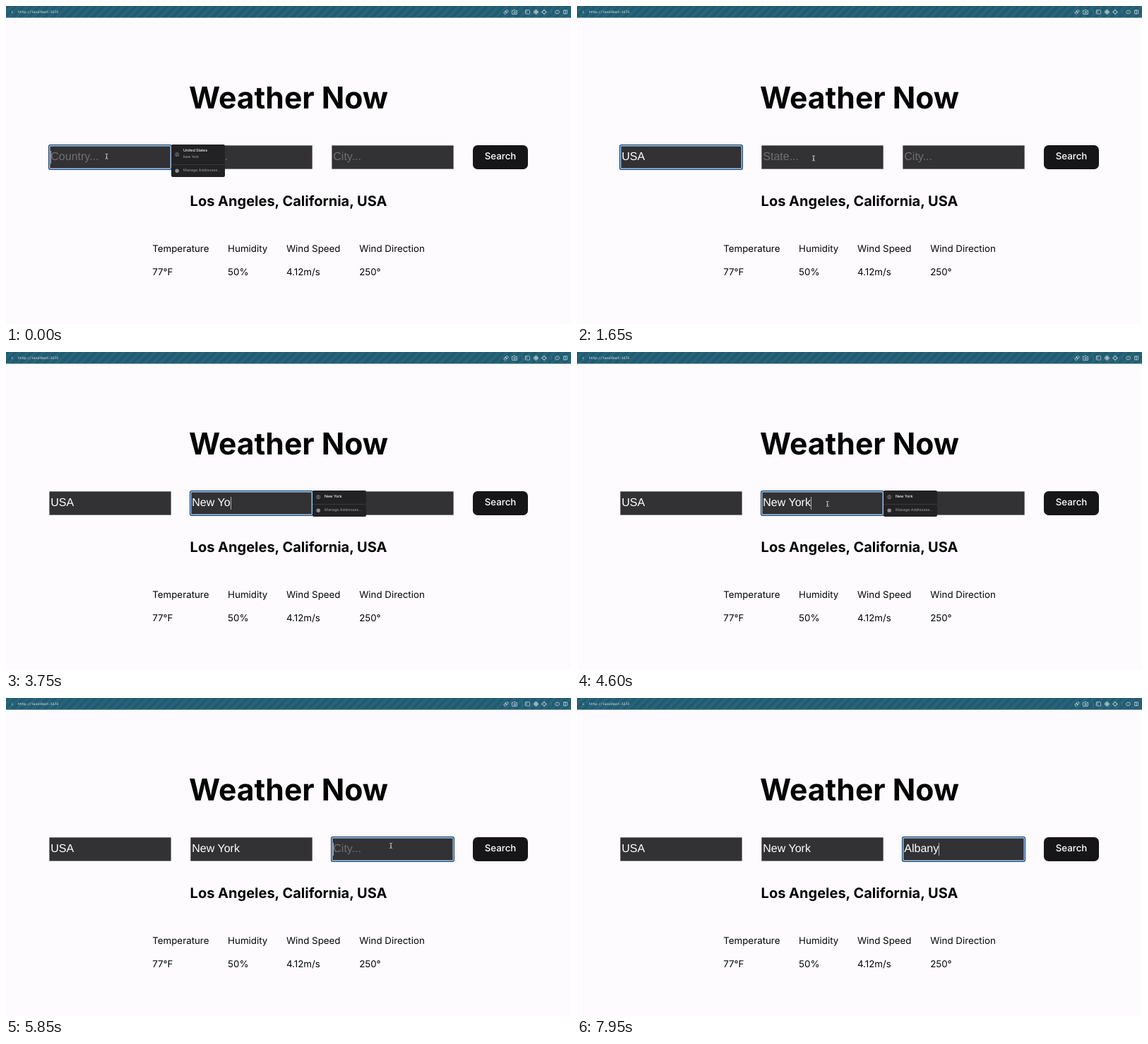
These frames come from a looping animation (800 by 450 pixels, 8 s). An HTML page:

```html
<!DOCTYPE html>
<html lang="en">
<head>
<meta charset="utf-8">
<title>Weather Now</title>
<style>
  html, body { margin: 0; width: 100%; height: 100%; overflow: hidden; }
  body {
    position: relative; background: #fdfbfe; color: #040405;
    font: 13.333px/20px Inter, sans-serif; text-rendering: geometricPrecision;
  }
  h1, h2, p { margin: 0; }
  h1, h2, .field, .button, .popup, .bar, .weather, #cursor { position: absolute; }

  .bar {
    left: 0; top: 0; width: 800px; height: 16px; border-bottom: 1px solid #7b9cab;
    background: repeating-linear-gradient(135deg, #215b70 0 4px, #276379 4px 8px);
    background-clip: padding-box;
  }
  .bar svg { display: block; }
  .bar text { fill: #fff; font: 500 4.53px "DejaVu Sans Mono", monospace; }

  h1, h2 { left: 0; width: 800px; text-align: center; font-weight: 700; white-space: nowrap; }
  h1 { top: 108px; font-size: 42.667px; line-height: 46.933px; }
  h2 { top: 260.8px; font-size: 20px; line-height: 30px; }

  .field {
    top: 196.9px; width: 173.3px; height: 33.9px; box-sizing: border-box;
    display: flex; align-items: center; padding-left: 1.3px;
    border: 1px solid #7c7b7e; border-radius: 1px; background: #323134; color: #fff;
    font: 16px "Liberation Sans", Arial, sans-serif; white-space: pre;
  }
  .field.focused {
    border-color: #9ccbf8; border-radius: 2px;
    box-shadow: 0 0 0 1px #14365c, inset 0 0 0 .4px #9ccbf8;
  }
  .hint { color: #707073; }
  .caret { width: 1px; height: 18.4px; margin-right: -1px; background: #b0b0b3; visibility: hidden; }

  .button {
    left: 661px; top: 196.9px; width: 78px; height: 33.9px; border-radius: 6.7px;
    background: #161518; color: #fff; font-weight: 500; line-height: 33.9px; text-align: center;
  }

  .weather { left: 0; top: 333.7px; width: 800px; display: flex; justify-content: center; gap: 26.667px; white-space: nowrap; }
  .weather p + p { margin-top: 13.333px; }

  .popup {
    top: 196px; width: 75.5px; box-sizing: border-box; border-radius: 2px; background: #222124;
    color: #fafafb; font-size: 5.3px; line-height: 9px; white-space: nowrap;
  }
  .popup div { position: relative; padding-left: 16.8px; box-sizing: border-box; }
  .popup .entry { font-weight: 500; padding-top: 5px; }
  .popup small { display: block; font-size: 4.8px; font-weight: 400; color: #b6b6b9; }
  .popup .manage { height: 18.5px; padding-top: 4.8px; border-top: .6px solid #3a393c; color: #a0a0a3; }
  .popup svg { position: absolute; left: 5.2px; top: 50%; margin-top: -3px; }

  #cursor { left: 0; top: 0; }
</style>
</head>
<body>
  <div class="bar">
    <svg width="800" height="16">
      <text x="7.6" y="10.4" font-weight="700">i</text>
      <text x="17" y="10.4">http://localhost:5173</text>
      <g fill="none" stroke="#c3d6dd" stroke-width=".8" stroke-linecap="round" stroke-linejoin="round">
        <g transform="rotate(-45 708 8.5)">
          <rect x="704.4" y="7" width="4.2" height="3" rx="1.5"/>
          <rect x="707.4" y="7" width="4.2" height="3" rx="1.5"/>
        </g>
        <path d="M716.8 6.5h1.4l.7-1.1h2.4l.7 1.1h1.4v5h-6.6z"/><circle cx="720.1" cy="8.8" r="1.3"/>
        <rect x="735.4" y="5.8" width="6.2" height="5.4" rx=".8"/><path d="M736.8 7.6l1 .9-1 .9"/>
        <circle cx="750.5" cy="8.5" r="2.9"/><circle cx="750.5" cy="8.5" r="1.3"/><path d="M747.6 8.5h5.8M750.5 5.6v5.8"/>
        <circle cx="762" cy="8.5" r="2.5"/><path d="M762 5v1.6M762 10.4V12M758.5 8.5h1.6M763.9 8.5h1.6"/>
        <path d="M779.6 6l-2.7 2.5 2.7 2.5M781.6 6l2.7 2.5-2.7 2.5M779.6 6l1 .9 1-.9M779.6 11l1-.9 1 .9"/>
        <rect x="789.4" y="6" width="5.4" height="5" rx=".6"/><path d="M792.1 6v5"/>
        <path d="M731 5.5v6M772 5.5v6" stroke="#5d8797" stroke-width=".5"/>
      </g>
    </svg>
  </div>

  <h1>Weather Now</h1>
  <div id="form"></div>
  <div class="button">Search</div>
  <h2>Los Angeles, California, USA</h2>
  <div class="weather">
    <div><p>Temperature</p><p>77°F</p></div>
    <div><p>Humidity</p><p>50%</p></div>
    <div><p>Wind Speed</p><p>4.12m/s</p></div>
    <div><p>Wind Direction</p><p>250°</p></div>
  </div>
  <div id="popups"></div>

  <svg id="cursor" width="6" height="10" viewBox="-3 -5 6 10" fill="none" stroke="#d6d6d8" stroke-width=".9">
    <path d="M-1.9-3.6Q0-3.6 0-2.4Q0-3.6 1.9-3.6M0-2.6V2.6M-1.9 3.6Q0 3.6 0 2.4Q0 3.6 1.9 3.6M-.9.9H.9"/>
  </svg>

<script>
const LOOP = 8000, BLINK = 500;

// focus: when the field is clicked; keys: when each letter of value is typed
const fields = [
  { x: 61, hint: 'Country...', focus: 0, value: 'USA', keys: [350, 550, 750],
    popup: { from: 0, to: 550, entry: 'United States', detail: 'New York', height: 27.5 } },
  { x: 261, hint: 'State...', focus: 1700, value: 'New York',
    keys: [2300, 2640, 2850, 3050, 3300, 3740, 4000, 4250],
    popup: { from: 2000, to: 4840, entry: 'New York', detail: '', height: 18.5 } },
  { x: 461, hint: 'City...', focus: 4840, value: 'Albany',
    keys: [6450, 6890, 7540, 7700, 7840, 7940] },
];

// Pointer moves and the spans in which typing has not hidden it
const moves = [
  { from: 950, to: 1640, start: [142.5, 212.8], end: [335, 215.5] },
  { from: 4550, to: 4820, start: [335, 215.5], end: [545, 209] },
];
const pointerShown = [[0, 350], [950, 2300], [4550, 6450]];

const within = (t, from, to) => t >= from && t < to;
const smooth = p => p * p * (3 - 2 * p);
const form = document.getElementById('form');
const popups = document.getElementById('popups');
const cursor = document.getElementById('cursor');

function add(parent, className, html) {
  const el = document.createElement('div');
  el.className = className;
  el.innerHTML = html;
  return parent.appendChild(el);
}

const personIcon = `<svg width="6.4" height="6.4" viewBox="-4 -4 8 8" fill="none" stroke="#a2a1a5" stroke-width=".7">
  <circle r="3.3"/><circle cy="-.8" r="1.1"/><path d="M-2 2.3Q0 0 2 2.3"/></svg>`;
const dotIcon = '<svg width="6.4" height="6.4" viewBox="-4 -4 8 8"><circle r="3.4" fill="#8f8e92"/></svg>';

for (const field of fields) {
  field.el = add(form, 'field',
    `<span></span><i class="caret"></i><span class="hint">${field.hint}</span>`);
  field.el.style.left = field.x + 'px';
  [field.text, field.caret, field.placeholder] = field.el.children;
  const { popup } = field;
  if (!popup) continue;
  popup.el = add(popups, 'popup',
    `<div class="entry" style="height:${popup.height}px">${personIcon}${popup.entry}<small>${popup.detail}</small></div>
     <div class="manage">${dotIcon}Manage Addresses...</div>`);
  popup.el.style.left = field.x + 173.3 + 'px';
}

function pointerAt(t) {
  let position = moves[0].start;
  for (const { from, to, start, end } of moves) {
    if (t < from) break;
    const p = smooth(Math.min(1, (t - from) / (to - from)));
    position = start.map((v, i) => v + (end[i] - v) * p);
  }
  return position;
}

function render(t) {
  fields.forEach((field, i) => {
    const blur = fields[i + 1]?.focus ?? LOOP;
    const focused = within(t, field.focus, blur);
    const count = field.keys.filter(key => key <= t).length;
    const lastInput = count ? field.keys[count - 1] : field.focus;
    const caretOn = focused && (t - lastInput) % (2 * BLINK) < BLINK;

    field.el.classList.toggle('focused', focused);
    field.text.textContent = field.value.slice(0, count);
    field.placeholder.style.display = count ? 'none' : '';
    field.caret.style.visibility = caretOn ? 'visible' : 'hidden';
    if (field.popup) {
      const { el, from, to } = field.popup;
      el.style.display = within(t, from, to) ? '' : 'none';
    }
  });

  const [x, y] = pointerAt(t);
  cursor.style.transform = `translate(${x - 3}px, ${y - 5}px)`;
  cursor.style.display = pointerShown.some(span => within(t, ...span)) ? '' : 'none';
}

const begin = performance.now();
function tick() {
  render((performance.now() - begin) % LOOP);
  requestAnimationFrame(tick);
}
tick();
</script>
</body>
</html>
```
